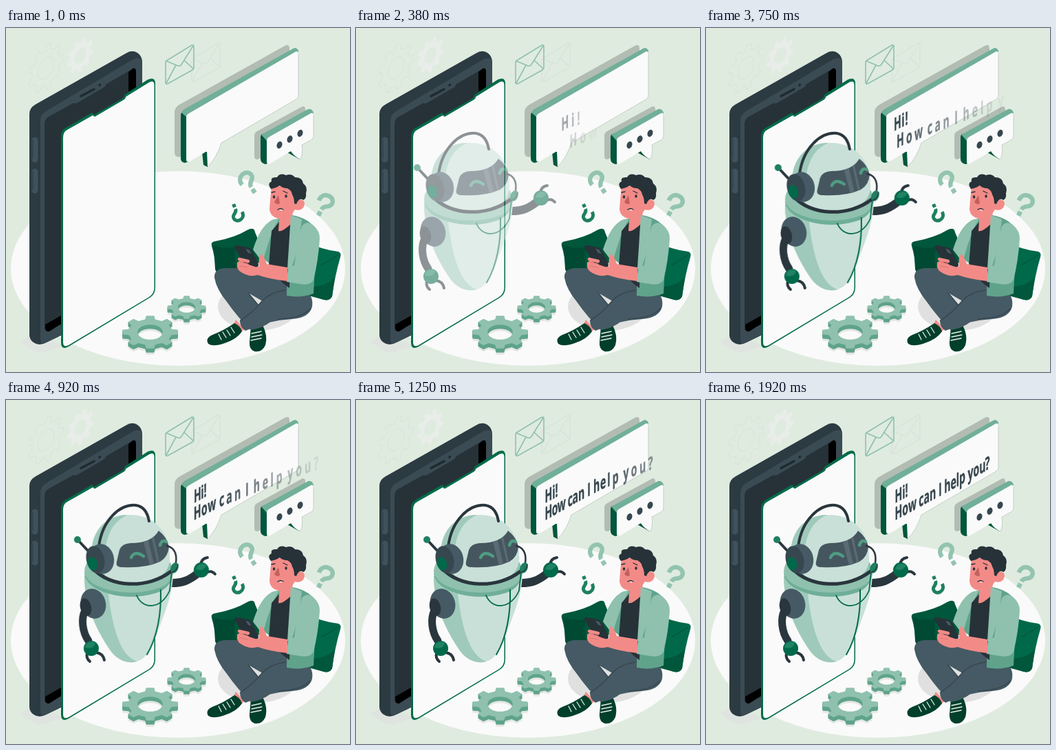
An HTML page that plays this animation: 500x500 px, repeating every 1.96 s.

```html
<!DOCTYPE html>
<html lang="en">
<head>
<meta charset="utf-8">
<title>Chat bot greeting</title>
<style>
  html, body { margin: 0; width: 100%; height: 100%; overflow: hidden; background: #dfebdf; }
  svg { display: block; width: 100vw; height: 100vh; }
  #robot { animation: enter 1960ms infinite; }
  @keyframes enter {
    0% { opacity: 0; transform: translateX(-30px); animation-timing-function: cubic-bezier(.36, -.01, .5, 1.38); }
    49%, 100% { opacity: 1; transform: none; }
  }
  #words { font: 700 26px "Open Sans", "Noto Sans", sans-serif; fill: #37474f; stroke: #37474f; stroke-width: .5; }
  .line { fill: none; stroke-linecap: round; stroke-linejoin: round; }
  .butt { fill: none; stroke-linecap: butt; }
  .dark { stroke: #2a363d; }
</style>
</head>
<body>
<svg viewBox="0 0 500 500">
  <defs>
    <g id="query">
      <path class="butt" stroke-width="5.800" d="M-8.500 0C-10 -14 9 -15 9 -4C9 3 0 1 0 9"/>
      <path stroke="none" d="M-3 12h6v6h-6z"/>
    </g>
    <g id="mail" class="line">
      <path d="M2 23L38 1Q41 0 41 3V34Q41 36 39 37L3 57Q0 58 0 55V26Q0 24 2 23Z"/>
      <path d="M1 24L18 31Q21 32 23 29L40 2M1 56L15 30M40 35L27 23"/>
    </g>
  </defs>

  <ellipse cx="250" cy="349.5" rx="243" ry="141.5" fill="#fafafa"/>
  <g id="gears"></g>
  <use href="#mail" x="270" y="21" stroke="#d8e2d8" stroke-width="1.200"/>
  <use href="#mail" x="232" y="24" stroke="#8fc1ae" stroke-width="1.600"/>

  <!-- phone -->
  <path fill="#e0e4e0" d="M20 456L40 444L84 462L56 471Q48 474 40 469Z"/>
  <path fill="#2c3a42" d="M34 125Q34 116 43 111L174 37Q183 31 191 36Q198 41 198 50V390L59 457Q48 463 40 457Q34 453 34 446Z"/>
  <path fill="#3a4b54" d="M50 135Q50 126 58 121L184 46Q198 39 198 53V390L56 458Q50 460 50 452Z"/>
  <path fill="#263238" d="M56 140Q56 132 62 129L98 109Q101 111 105 108L141 87Q145 85 145 82L181 61Q189 57 189 65V385L62 439Q56 442 56 435Z"/>
  <path fill="#000" d="M178 64L184 59Q189 57 189 64V92H178ZM57 431L80 418V430L63 441Q57 442 57 436Z"/>
  <path class="line" stroke="#1f2a2f" stroke-width="3.5" d="M109 99L128 89M136 83L136.5 82.700"/>
  <path class="line" stroke="#3f515a" stroke-width="9" d="M42 163V191M42 209V236"/>
  <path class="line" stroke="#2c3a42" stroke-width="1" d="M39 163V190M39 209V235"/>
  <path fill="#006b4a" d="M80 157Q80 149 87 145L125 123L128 126L168 103Q172 101 172 97L206 75Q217 70 217 81V377Q217 387 209 392L91 463Q80 469 80 457Z"/>
  <path fill="#fafafa" d="M83 159Q83 151 89 148L126 127L129 129L170 105Q174 103 174 100L208 79Q215.500 75 215.500 83V377Q215.500 386 208 391L91 461Q83 465 83 457Z"/>

  <!-- robot -->
  <g id="robot">
    <path class="line dark" stroke-width="4" d="M105 205L120 221"/>
    <circle cx="103" cy="203" r="5" fill="#1f7f60"/>
    <path class="butt dark" stroke-width="12" d="M236 266C255 267 266 262 279 251"/>
    <path class="line dark" stroke-width="4" d="M282 240Q283 230 292 229M289 252Q297 246 303 253"/>
    <circle cx="283" cy="247" r="11" fill="#00694a"/>
    <path fill="#1f8263" d="M275 246Q279 234 291 240Q286 250 275 246Z"/>
    <path fill="#c9e0d8" d="M113 256C113 300 132 335 148 360C160 380 178 384 192 379C208 373 215 348 224 325C238 290 242 270 242 250Z"/>
    <path fill="#9fcabb" d="M113 256C113 300 132 335 148 360C160 380 178 384 190 380C164 373 152 325 147 272Z"/>
    <path fill="#6fae98" d="M113 252Q115 272 150 282Q184 291 219 280Q241 272 242 248Z"/>
    <path fill="#8fc1ae" d="M122 231Q113 238 113 250Q116 268 152 277Q190 285 225 272Q242 264 242 248L238 236Z"/>
    <path class="line" stroke="#00694a" stroke-width="2" d="M224 276C225 310 219 345 204 370"/>
    <path class="line" stroke="#00694a" stroke-width="1.800" d="M189 284C197 304 224 306 237 277L240 250"/>
    <path fill="#c9e0d8" d="M124 232C119 192 145 166 182 167C217 168 238 196 237 226Q239 245 224 256Q188 275 148 262Q126 254 124 232Z"/>
    <path fill="#9fcabb" d="M124 232C119 192 145 166 176 167C150 178 139 205 143 260Q126 252 124 232Z"/>
    <path fill="#45565f" d="M160 235L164 218Q167 209 180 208Q211 208 221 190Q233 199 236 213Q235 228 223 235Q201 245 168 243Q158 243 160 235Z"/>
    <path fill="#5a6b74" d="M199 207L206 204L214 238L208 240ZM211 201L214 199L222 235L219 236Z"/>
    <path class="line" stroke="#4f9c82" stroke-width="4.500" d="M181 229Q186 218 199 227M223 211Q226 202 232 206"/>
    <path class="line dark" stroke-width="5" d="M126 245C150 273 206 275 239 249"/>
    <path class="line dark" stroke-width="4" d="M134 213C139 174 165 151 188 153C200 155 205 164 207 176"/>
    <ellipse cx="138" cy="231" rx="18" ry="22" fill="#455a64" transform="rotate(-14 138 231)"/>
    <ellipse cx="129" cy="232" rx="13" ry="20" fill="#37474f" transform="rotate(-14 129 232)"/>
    <ellipse cx="125" cy="238" rx="7" ry="10" fill="#00694a" transform="rotate(-14 125 238)"/>
    <path class="line dark" stroke-width="2.500" d="M233 212Q249 216 246 237"/>
    <ellipse cx="244" cy="244" rx="5.500" ry="8" fill="#1f7f60" transform="rotate(22 244 244)"/>
    <path class="line dark" stroke-width="1.500" d="M241 250Q248 248 249 239"/>
    <path class="line dark" stroke-width="11" d="M114 306C108 318 110 337 119 350"/>
    <ellipse cx="126" cy="296" rx="18" ry="22" fill="#455a64" transform="rotate(-18 126 296)"/>
    <ellipse cx="115" cy="301" rx="8" ry="13" fill="#2a363d" transform="rotate(-14 115 301)"/>
    <path class="line dark" stroke-width="4" d="M117 368Q115 375 121 380M130 367Q140 368 142 378"/>
    <circle cx="123" cy="361" r="11" fill="#00694a"/>
    <path fill="#1f8263" d="M114 360Q116 349 129 352Q129 363 114 360Z"/>
  </g>

  <!-- speech bubbles -->
  <path fill="#b2bcb3" d="M245 123Q245 116 251 112L405 26Q412 22 412 30V102L255 187Q245 189 245 181Z"/>
  <path fill="#00573c" d="M254 127Q254 121 260 122L266 128V194L260 196Q254 195 254 190ZM285 180H296L293 202L287 199Z"/>
  <path fill="#70af99" d="M255 123Q256 120 259 118L417 30Q422 27 425 33V38L263 130Z"/>
  <path fill="#fafafa" d="M262 130Q262 126 266 124L420 35Q425 32 425 38V98Q425 102 421 104L313 167Q306 189 293 202L292 179L267 194Q262 196 262 191Z"/>
  <path class="line" stroke="#a9b8af" stroke-width=".6" d="M425 38V98Q425 102 421 104L313 167Q306 189 293 202"/>
  <path fill="#b2bcb3" d="M361 157Q361 152 365 150L429 115Q435 112 435 119V158L368 190Q361 193 361 186Z"/>
  <path fill="#00573c" d="M370 159Q370 153 376 154L383 160V196L377 198Q370 196 370 191ZM409 181L419 177L427 191Z"/>
  <path fill="#70af99" d="M371 155L439 118Q445 117 447 123V127L379 164Z"/>
  <path fill="#fafafa" d="M379 164Q379 160 383 158L443 124Q447 122 447 127V157Q447 161 443 163L430 170Q432 182 428 191Q419 187 414 179L384 197Q379 199 379 194Z"/>
  <path class="line" stroke="#a9b8af" stroke-width=".6" d="M447 127V157Q447 161 443 163L430 170Q432 182 428 191"/>
  <g fill="#37474f">
    <ellipse cx="397.500" cy="170" rx="3.800" ry="5.300" transform="rotate(22 397.500 170)"/>
    <ellipse cx="412.500" cy="161.500" rx="3.800" ry="5.300" transform="rotate(22 412.500 161.500)"/>
    <ellipse cx="427.500" cy="153" rx="3.800" ry="5.300" transform="rotate(22 427.500 153)"/>
  </g>
  <g id="words"></g>

  <g fill="#93c4b0" stroke="#93c4b0">
    <use href="#query" transform="translate(351 223) rotate(-33) scale(1.1)"/>
    <use href="#query" transform="translate(463 255) rotate(27) scale(1.1)"/>
    <use href="#query" transform="translate(336.500 270) rotate(157) scale(.85)" fill="#1f7f60" stroke="#1f7f60"/>
  </g>

  <!-- seated man -->
  <ellipse cx="366" cy="405" rx="58" ry="35" fill="#e0e0e0"/>
  <path fill="#00573b" d="M299 317Q297 311 304 310Q332 305 352 293Q361 289 362 297L378 335L350 352Q328 350 312 356Q305 356 304 350Q304 333 299 317Z"/>
  <path fill="#004a33" d="M301 316Q320 322 334 318Q330 336 335 350Q320 352 312 356Q305 356 304 350Q304 333 301 316Z"/>
  <path fill="#00694a" d="M440 312Q458 322 483 325Q488 327 486 333Q478 360 474 390Q471 397 462 395Q444 388 425 386Z"/>
  <path fill="#00573b" d="M447 376Q468 374 478 362L474 390Q471 397 462 395L440 389Z"/>
  <path class="line" stroke="#00573b" stroke-width="1.500" d="M482 330Q468 340 459 344"/>

  <path fill="#f28b87" d="M334 424L346 438L340 444L330 433ZM355 430L371 426L369 438L357 439Z"/>
  <path fill="#003f2b" d="M332 429Q341 433 343 441Q336 452 318 458Q301 464 294 459Q289 451 300 446Q316 440 332 429ZM356 434Q365 439 373 432Q381 447 377 461Q372 472 361 470Q353 467 354 456Z"/>
  <path class="line" stroke="#e8f0ea" stroke-width="1.300" d="M309 445L313 453M315 442L320 450M321 439L326 447M327 435L332 443M357 444L371 441M357 449L372 446M356 454L371 451"/>
  <path fill="#455a64" d="M303 363Q302 350 318 349L350 349Q398 354 414 376L402 402L378 400L352 385L386 426Q372 437 356 439Q337 421 321 398Q306 380 303 363Z"/>
  <path fill="#455a64" d="M340 425Q356 415 372 397Q389 381 412 380L437 384Q447 390 445 405Q441 421 416 423Q380 425 348 440Q340 435 340 425Z"/>
  <path class="line" stroke="#37474f" stroke-width="1.500" d="M341 425Q357 415 372 397Q384 384 406 381M352 385L366 402M396 423Q430 422 442 408"/>

  <path fill="#5fa38b" d="M387 279L416 272Q440 276 452 294L447 386Q428 393 408 389L410 300L386 345L360 324Q367 291 387 279Z"/>
  <path fill="#8fc1ae" d="M387 279L397 277Q384 298 373 341L359 322Q370 287 387 279Z"/>
  <path fill="#263238" d="M386 295L397 282L414 280L412 378Q395 367 382 345Z"/>
  <path fill="#f28b87" d="M398 266L417 268L414 285Q401 297 396 295Z"/>
  <path fill="#8fc1ae" d="M414 272L430 278Q426 320 414 352L409 350Z"/>
  <path fill="#8fc1ae" d="M430 288Q437 279 447 287Q456 295 456 306Q454 338 447 366Q442 375 427 372L408 369L410 347L419 345Q423 311 430 288Z"/>

  <path fill="#f28b87" d="M409 348L409 368Q383 365 366 359Q352 363 339 353Q332 344 340 338L350 335L368 347Q366 333 371 328Q377 335 379 343Z"/>
  <path fill="#263238" d="M332 319Q332 315 337 316L352 319Q356 320 358 324L367 344Q367 348 362 347L350 343Q346 342 344 339Z"/>
  <path fill="#455a64" d="M348 321L353 322L357 328L352 327Z"/>
  <path class="line" stroke="#f28b87" stroke-width="4.500" d="M339 336L352 339M338 342L351 345M341 348L353 350"/>
  <path class="line" stroke="#d76f6d" stroke-width=".8" d="M341 340L352 342M340 346L352 348"/>

  <path fill="#f28b87" d="M386 230Q384 248 383 263Q384 275 397 277Q412 277 420 264Q432 267 434 256Q434 248 424 250L421 229Z"/>
  <path fill="#263238" d="M385 234Q379 226 386 223Q384 216 394 217Q398 210 407 214Q415 211 420 217Q431 217 432 226Q439 231 436 240Q437 248 432 250Q426 246 422 256L419 255Q419 247 416 242Q415 236 409 233Q402 233 398 229Q392 233 385 234Z"/>
  <path fill="#c2605f" d="M396 243L390 253Q394 258 398 255Z"/>
  <path class="line" stroke="#263238" stroke-width="1.300" d="M386 239L391 238M403 237L409 240M395 264Q399 261 403 264"/>
  <path fill="#fff" d="M397 264L403 264L400 265.500Z"/>
  <g fill="#263238"><ellipse cx="389.500" cy="245.500" rx="1.700" ry="2.300"/><ellipse cx="407" cy="244.500" rx="1.700" ry="2.300"/></g>
</svg>

<script>
const LOOP = 1960;
const byId = id => document.getElementById(id);

function add(parent, tag, attrs) {
  const el = document.createElementNS("http://www.w3.org/2000/svg", tag);
  for (const key in attrs) el.setAttribute(key, attrs[key]);
  return parent.appendChild(el);
}

// Cog outline with an elliptical hole
function cog(rx, ry, teeth, hole, turn = 0) {
  const step = 2 * Math.PI / teeth, pts = [];
  for (let i = 0; i < teeth; i++) {
    for (const [off, r] of [[-.29, .79], [-.18, 1], [.18, 1], [.29, .79]]) {
      const a = turn + (i + off) * step;
      pts.push((rx * r * Math.cos(a)).toFixed(1) + " " + (ry * r * Math.sin(a)).toFixed(1));
    }
  }
  const hx = rx * hole, hy = ry * hole;
  return `M${pts.join("L")}ZM${-hx} 0a${hx} ${hy} 0 1 0 ${2 * hx} 0a${hx} ${hy} 0 1 0 ${-2 * hx} 0Z`;
}

function thickCog(x, y, d, depth) {
  const layer = (dy, fill) => add(byId("gears"), "path",
    { d, fill, "fill-rule": "evenodd", transform: `translate(${x} ${y + dy})` });
  layer(depth + 3, "#e3e6e3");
  for (let dy = depth; dy > 0; dy--) layer(dy, "#5fa38b");
  layer(0, "#8fc1ae");
}

const tilt = (x, y) => `matrix(.8 -.46 0 1 ${x} ${y})`;
add(byId("gears"), "path", { d: cog(32, 32, 9, .46), fill: "none", stroke: "#d8e2d8", "stroke-width": 1, transform: tilt(58, 58) });
add(byId("gears"), "path", { d: cog(24, 24, 9, .46, .2), fill: "#e9ede9", "fill-rule": "evenodd", transform: tilt(108, 40) });
thickCog(209.5, 442, cog(40.5, 24, 8, .45), 6);
thickCog(262.5, 406, cog(28, 17, 8, .45), 5);

// Letters laid out along the slanted bubble face
const SQUEEZE = .54, SLOPE = -.545;
const pen = document.createElement("canvas").getContext("2d");
pen.font = '700 26px "Open Sans", "Noto Sans", sans-serif';
const letters = [];
for (const [line, base] of [["Hi!", 150], ["How can I help you?", 175]]) {
  [...line].forEach((char, i) => {
    if (char === " ") return;
    const run = pen.measureText(line.slice(0, i)).width * SQUEEZE;
    const el = add(byId("words"), "text", {});
    el.textContent = char;
    letters.push({ el, x: 274.5 + run, y: base + run * SLOPE });
  });
}

// Index of the letter that is just arriving, by time in ms
const FRONT = [[0, -18], [380, -7], [580, -1.5], [920, 5.8], [1250, 11.5], [1580, 18], [LOOP, 25]];

function frontAt(t) {
  const k = FRONT.findIndex(p => p[0] > t);
  const [t0, a] = FRONT[k - 1], [t1, b] = FRONT[k];
  return a + (b - a) * (t - t0) / (t1 - t0);
}

function shift(lead) {
  if (lead > 0) return 3 * lead + .06 * lead * lead;
  return lead > -8 ? 2 * Math.sin(Math.PI * lead / 8) : 0;
}

let start;
function draw(now) {
  start ??= now;
  const front = frontAt((now - start) % LOOP);
  letters.forEach(({ el, x, y }, i) => {
    const lead = i - front;
    el.setAttribute("transform", `matrix(${SQUEEZE} ${SQUEEZE * SLOPE} 0 1 ${x + shift(lead)} ${y})`);
    el.setAttribute("opacity", Math.max(0, Math.min(1, 1 - lead / 12.5)));
  });
  requestAnimationFrame(draw);
}
requestAnimationFrame(draw);
</script>
</body>
</html>
```
